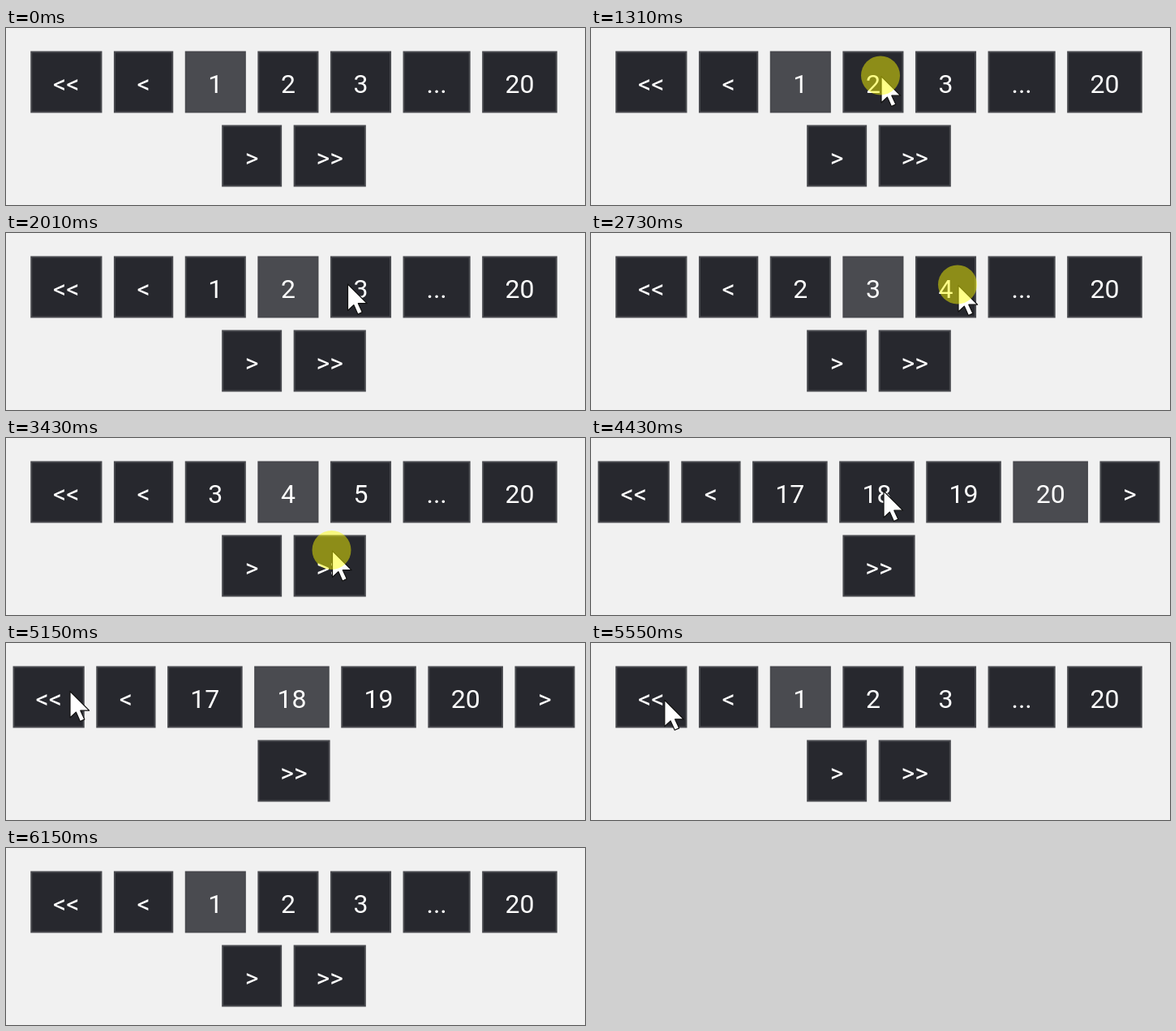
Write an HTML page that moves like this. It is 714x218 px and loops after 6.65 s.

```html
<!DOCTYPE html>
<html lang="en">
<head>
<meta charset="utf-8">
<title>Pagination</title>
<style>
html, body { margin: 0; width: 100%; height: 100%; overflow: hidden; background: #f1f1f1; }
svg { display: block; width: 714px; height: 218px; }
rect { stroke: #48494e; stroke-width: 2; }
text { font: 32px Roboto, sans-serif; fill: #fff; text-anchor: middle; }
</style>
</head>
<body>
<svg viewBox="0 0 714 218">
  <g id="pager"></g>
  <path id="cursor" d="M0 0V32.5L7.3 25.6L12.4 37L17.8 34.6L12.8 23.7H23.6Z"
    fill="#fff" stroke="#111" stroke-width="1.2" stroke-linejoin="round"/>
  <circle id="click" r="24" fill="#ff0" fill-opacity=".47"/>
</svg>
<script>
const LOOP = 6650, STEP = 100, GAP = 14.5, MID = 355;
const NS = 'http://www.w3.org/2000/svg';
const [pager, cursor, click] = ['pager', 'cursor', 'click'].map(id => document.getElementById(id));

const WIDTHS = { '<<': 88.2, '<': 73.3, '>': 74, '>>': 89.2, '...': 83.1 };
const width = label => WIDTHS[label] || (label.length > 1 ? 92.6 : 75.1);

const START = [['<< < 1 2 3 ... 20', '> >>'], '1'];
const END = ['<< < 17 18 19 20 >', '>>'];
// start time, rows, active page
const PAGES = [
  [0, ...START],
  [1410, START[0], '2'],
  [2330, ['<< < 2 3 4 ... 20', '> >>'], '3'],
  [2930, ['<< < 3 4 5 ... 20', '> >>'], '4'],
  [3530, END, '20'],
  [4730, END, '18'],
  [5450, ...START]
];

const SHOW = 310, HIDE = 6150, ORIGIN = [413, 166];
// first step, last step, x, y, sideways bow
const MOVES = [
  [410, 410, 357.5, 65.5, 0],
  [610, 610, 362, 65.5, 0],
  [910, 1010, 358, 59.5, 0],
  [1510, 1910, 420.5, 63, 3],
  [2010, 2010, 421.5, 63, 0],
  [2230, 2230, 421.5, 64.5, 0],
  [2430, 2630, 453, 64.5, 0],
  [2930, 3230, 402.5, 139, 0],
  [3630, 3830, 413.5, 166, 0],
  [4130, 4430, 361, 65.5, 0],
  [4850, 5150, 79, 59.5, 10],
  [5250, 5250, 62, 64.5, 0],
  [5550, 5950, 339, 120, 0],
  [6050, 6050, 374.5, 143, 0]
];
const CLICKS = [1310, 2230, 2730, 3430, 4630, 5350];

function add(tag, attrs, text = '') {
  const el = document.createElementNS(NS, tag);
  for (const key in attrs) el.setAttribute(key, attrs[key]);
  el.textContent = text;
  pager.append(el);
}

function drawPage([, rows, active]) {
  pager.replaceChildren();
  rows.forEach((row, i) => {
    const labels = row.split(' ');
    const total = labels.reduce((sum, s) => sum + width(s) + GAP, -GAP);
    let x = MID - total / 2;
    const y = 28.5 + 91 * i;
    for (const label of labels) {
      const w = width(label);
      add('rect', { x: x + 1, y: y + 1, width: w - 2, height: 74,
        fill: label === active ? '#4a4b50' : '#27282e' });
      add('text', { x: x + w / 2, y: y + 51 }, label);
      x += w + GAP;
    }
  });
}

function cursorAt(t) {
  let [x, y] = ORIGIN;
  for (const [from, to, nx, ny, bow] of MOVES) {
    if (t < from) break;
    const steps = (to - from) / STEP + 1;
    const p = Math.min(1, (Math.floor((t - from) / STEP) + 1) / steps);
    const e = p * p * (3 - 2 * p);
    x += (nx - x) * e;
    y += (ny - y) * e + bow * Math.sin(Math.PI * p);
  }
  return [x, y];
}

let shown;
function render(t) {
  const page = PAGES.findLast(p => p[0] <= t);
  if (page !== shown) drawPage(shown = page);
  const [x, y] = cursorAt(t);
  cursor.setAttribute('transform', `translate(${x} ${y})`);
  cursor.style.display = t >= SHOW && t < HIDE ? '' : 'none';
  click.setAttribute('cx', x - 1);
  click.setAttribute('cy', y - 1);
  click.style.display = CLICKS.some(c => t >= c && t < c + STEP) ? '' : 'none';
}

const begin = performance.now();
function tick() {
  render((performance.now() - begin) % LOOP);
  requestAnimationFrame(tick);
}
tick();
</script>
</body>
</html>
```
